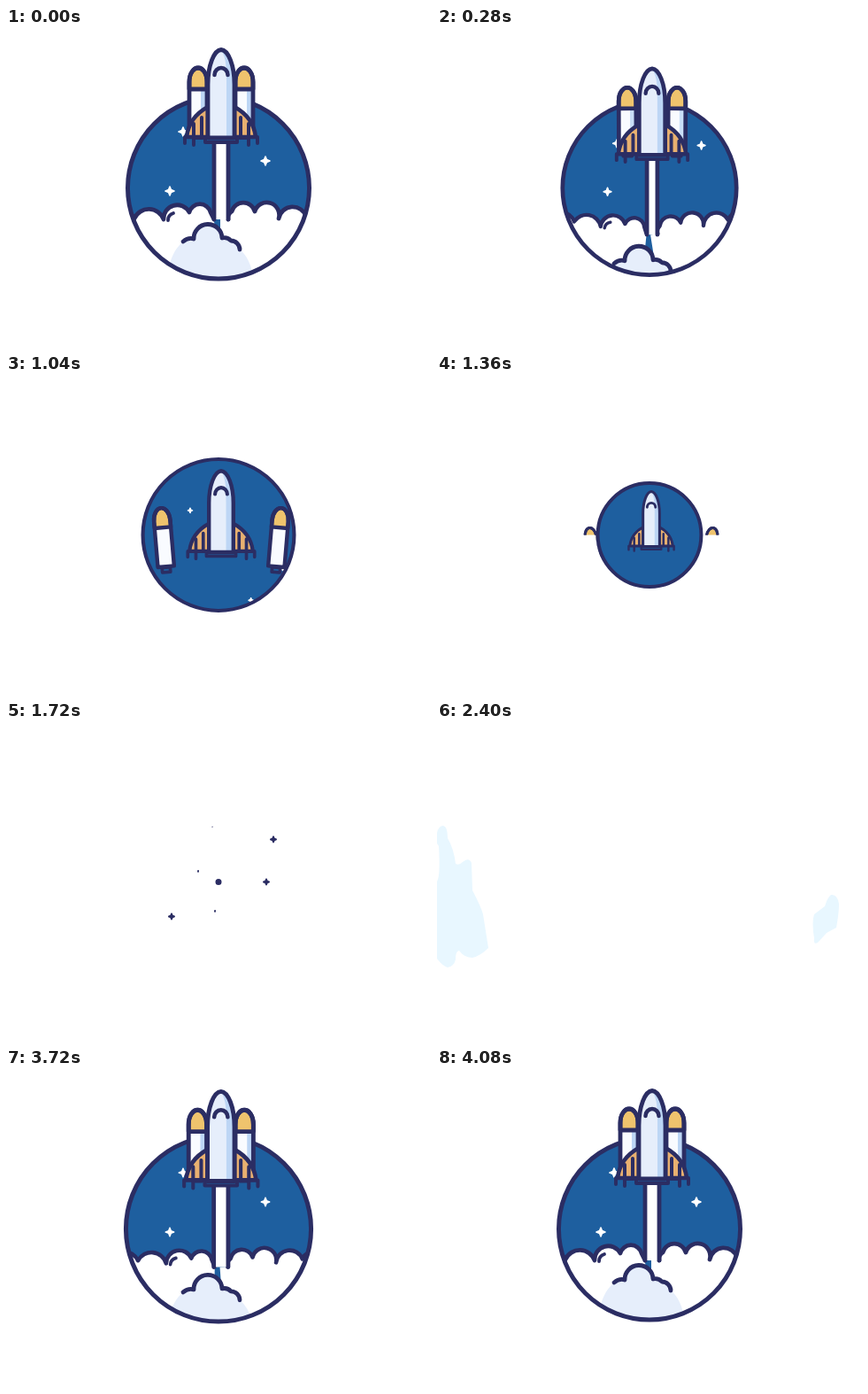
An HTML page with a canvas for the animation above (4120 ms loop, 480 px wide and 360 px high).

```html
<!DOCTYPE html>
<html lang="en">
<head>
<meta charset="utf-8">
<title>Rocket launch</title>
<style>
html, body { margin: 0; width: 100%; height: 100%; overflow: hidden; background: #fff; }
canvas { display: block; }
</style>
</head>
<body>
<canvas id="stage" width="480" height="360"></canvas>
<script>
const ctx = document.getElementById('stage').getContext('2d');
const LOOP = 4120, STEP = 40, CX = 240, CY = 180.5;
const COLLAPSE = 1140, BURST = 1720, BURST_END = 2240, MIST_IN = 2240, ENTER = 3080, SETTLED = 3960;
const INK = '#2b2d63', SKY = '#1e5f9f', PALE = '#e6eefb', ICE = '#bdd6f5';
const GOLD = '#efc36d', PEACH = '#e8b070', MIST = '#e8f7ff';

const span = (t, from, to) => Math.min(1, Math.max(0, (t - from) / (to - from)));
const mix = (a, b, u) => a + (b - a) * u;
const smooth = u => u * u * (3 - 2 * u);

// Ease-out with a slight overshoot; a higher delay holds the start back longer.
function spring(u, delay) {
  const left = 1 - u ** delay;
  return 1 - 1.8 * left ** 3 + 0.8 * left ** 2;
}

function shape(path, fill, stroke, width) {
  if (fill) { ctx.fillStyle = fill; ctx.fill(path); }
  if (stroke) { ctx.strokeStyle = stroke; ctx.lineWidth = width; ctx.stroke(path); }
}

function group(x, y, angle, sx, sy, draw) {
  ctx.save();
  ctx.translate(x, y);
  ctx.rotate(angle);
  ctx.scale(sx, sy);
  draw();
  ctx.restore();
}

// Cloud outlines are relative to the end that meets the trail.
const leftPuffs = 'M-121 4A18 18 0 0 1 -88 0A17.800 17.800 0 0 1 -55 1A15.400 15.400 0 0 1 -26 -7A12.400 12.400 0 0 1 -2 -7L2 1';
const rightPuffs = 'M-1 1Q-2 -5 3 -8A13.500 13.500 0 0 1 29 -8A14 14 0 0 1 56 0A16 16 0 0 1 87 -2A18 18 0 0 1 120 2';
const frontPuffs = 'M200 241Q206 236 212 238A16 16 0 0 1 244 237A10 10 0 0 1 254 240A10 10 0 0 1 264 250';
const boosterNose = 'M-10 26V18C-10 8 -5 2 0 2S10 8 10 18V';

const art = {
  body: new Path2D('M0 2.5C8 3 15 20 15 42V102H-15V42C-15 20 -8 3 0 2.5Z'),
  shade: new Path2D('M2 3C9 6 15 20 15 42V102H6V42C6 24 6 12 0 3Z'),
  window: new Path2D('M-7.5 31A7.5 8 0 0 1 7.5 31'),
  fin: new Path2D('M-15 67C-26 73 -37 84 -39 101H-15Z'),
  finLines: new Path2D('M-41 101V108M-31 86V110M-22 79V101'),
  nozzle: new Path2D('M-18 102H18V107H-18Z'),
  booster: new Path2D(boosterNose + '74H-10Z'),
  boosterShade: new Path2D('M3 27H9V73H3Z'),
  cap: new Path2D(boosterNose + '26Z'),
  boosterNozzle: new Path2D('M-5 75H5V81H-5Z'),
  left: { line: new Path2D(leftPuffs), fill: new Path2D(leftPuffs + 'L9 120H-121Z') },
  right: { line: new Path2D(rightPuffs), fill: new Path2D(rightPuffs + 'V120H-10V1Z') },
  glint: new Path2D('M-50 2Q-50 -4 -44 -6'),
  frontLine: new Path2D(frontPuffs),
  frontFill: new Path2D(frontPuffs + 'Q279 262 281 295H180C183 262 190 250 200 241Z'),
  mist: new Path2D('M0 125Q2 117 7 117Q12 118 12 131Q19 143 21 160Q25 162 29 158Q36 152 39 159L40 190Q50 209 52 217L58 255Q49 264 40 266Q31 266 25 258Q21 258 21 268Q19 276 12 277Q6 275 0 267V180Q4 174 2 140L0 137Z'
    + 'M445 195Q452 194 454 205Q454 216 451 232L440 238L430 249Q425 252 426 244Q423 226 426 217L438 208Q441 198 445 195Z')
};

function star(x, y, size, color, outline) {
  if (size <= 0) return;
  const p = new Path2D();
  for (let i = 0; i <= 8; i++) {
    const reach = i % 2 ? size * 0.4 : size, a = i * Math.PI / 4;
    p.lineTo(x + reach * Math.sin(a), y - reach * Math.cos(a));
  }
  shape(p, color, color, outline);
}

// Start position and drift; all stars share one downward acceleration.
const stars = [
  { x: 293, y: 150, vx: 0.02, vy: -0.11 },
  { x: 185, y: 184, vx: 0.027, vy: -0.045 },
  { x: 200, y: 117, vx: 0.011, vy: 0 },
  { x: 260, y: 33, vx: 0.016, vy: 0.036 },
  { x: 208, y: -31, vx: 0, vy: 0 }
];

function drawStars(t, size) {
  for (const s of stars) star(s.x + s.vx * t, s.y + s.vy * t + 1.7e-4 * t * t, size, '#fff', 1.6);
}

function drawClouds(drop) {
  const turn = Math.min(1, Math.max(0, drop)), size = 1 - 0.24 * turn;
  const both = draw => {
    for (const [cloud, x, dir] of [[art.left, 233, 1], [art.right, 252, -1]])
      group(x + 6 * dir * turn, 215 + 49 * drop, 0.48 * dir * turn, size, size, () => draw(cloud));
  };
  both(cloud => shape(cloud.fill, '#fff'));
  both(cloud => {
    shape(cloud.line, null, INK, 4.8);
    if (cloud === art.left) shape(art.glint, null, INK, 3.8);
  });
}

function drawTrail(x, top, bottom, half) {
  if (half < 0.5) return;
  const column = new Path2D();
  column.moveTo(x - half, bottom);
  column.lineTo(x - half, top);
  column.lineTo(x + half, top);
  column.lineTo(x + half, bottom);
  shape(column, '#fff', INK, Math.min(4.8, half * 0.8));
}

function drawBooster(shadeAlpha) {
  shape(art.boosterNozzle, SKY, INK, 4);
  shape(art.booster, '#f9fbff');
  ctx.globalAlpha = shadeAlpha;
  shape(art.boosterShade, ICE);
  ctx.globalAlpha = 1;
  shape(art.cap, GOLD, INK, 4.8);
  shape(art.booster, null, INK, 4.8);
}

function drawRocket(split) {
  for (const side of [-1, 1])
    group(side * (26 + 48 * split), 21 + 25 * split, side * 0.085 * split, 1, 1,
      () => drawBooster(Math.max(0, 1 - 4 * split)));
  for (const side of [1, -1]) group(0, 0, 0, side, 1, () => {
    shape(art.fin, PEACH, INK, 4.6);
    shape(art.finLines, null, INK, 4);
  });
  shape(art.nozzle, SKY, INK, 4);
  shape(art.body, PALE);
  shape(art.shade, ICE);
  shape(art.body, null, INK, 4.8);
  shape(art.window, null, INK, 4.5);
}

// Launch, booster separation, then everything shrinks to a dot.
function leaving(t) {
  const launch = smooth(span(t, 0, 850)), keep = 1 - smooth(span(t, COLLAPSE, BURST));
  return {
    outer: mix(3.5, mix(105, 87.5, launch), keep),
    x: CX + 3 * keep,
    tip: mix(CY, mix(22, 106, launch), keep),
    scale: mix(1, 0.92, launch) * keep,
    drop: Math.min(2.2, (t / 560) ** 1.6),
    half: Math.max(0, 8 - 0.0075 * t),
    split: (t / 1040) ** 2.2,
    starTime: t,
    starSize: mix(5, 2.5, launch)
  };
}

// The disc springs open, the rocket rises, clouds and stars follow.
function entering(t) {
  const u = span(t, ENTER, SETTLED), open = spring(u, 1.4);
  const settle = spring(span(t, 3420, SETTLED), 1.4), scale = mix(0.2, 1, open);
  return {
    outer: 105 * open,
    x: CX + 3 * settle,
    tip: mix(260, 22, spring(u, 1.9)),
    scale,
    drop: 2.2 * (1 - settle),
    half: 8 * scale,
    split: 0,
    starTime: 0,
    starSize: 5 * settle
  };
}

function drawScene({ outer, x, tip, scale, drop, half, split, starTime, starSize }) {
  if (outer < 0.3) return;
  const line = Math.min(outer, Math.max(4, outer * 0.047));
  const disc = new Path2D();
  disc.arc(CX, CY, outer - line / 2, 0, Math.PI * 2);
  shape(disc, SKY);
  ctx.save();
  ctx.clip(disc);
  drawStars(starTime, starSize);
  drawClouds(drop);
  drawTrail(x, tip + 104 * scale, 216 + 52 * drop, half);
  ctx.translate(0, 75 * drop);
  shape(art.frontFill, PALE);
  shape(art.frontLine, null, INK, 4.8);
  ctx.restore();
  shape(disc, null, INK, line);

  // The rocket may rise above the disc but never hang below it.
  const gate = new Path2D();
  gate.rect(0, 0, 480, CY);
  gate.arc(CX, CY, outer, 0, Math.PI);
  ctx.save();
  ctx.clip(gate);
  group(x, tip, 0, scale, scale, () => drawRocket(split));
  ctx.restore();
}

const sparks = [[62, -48, 3], [54, 0, 3], [-53, 39, 3], [-4, 33, 1], [-23, -12, 1], [-7, -62, 0.4]];

function drawSparks(u) {
  const spread = 1 + 0.85 * smooth(u), grow = (1 - u) * (1 + 3 * u);
  for (const [x, y, s] of sparks)
    star(CX + x * spread, CY + y * spread, s * grow, INK, Math.min(2, s * grow));
}

function render(t) {
  ctx.fillStyle = '#fff';
  ctx.fillRect(0, 0, 480, 360);
  ctx.lineCap = ctx.lineJoin = 'round';
  if (t <= BURST) drawScene(leaving(t));
  if (t >= ENTER) drawScene(entering(t));
  if (t >= BURST && t < BURST_END) drawSparks(span(t, BURST, BURST_END));
  if (t > MIST_IN && t < ENTER) {
    ctx.globalAlpha = span(t, MIST_IN, MIST_IN + 160);
    shape(art.mist, MIST);
    ctx.globalAlpha = 1;
  }
}

const start = performance.now();
function tick() {
  const t = (performance.now() - start) % LOOP;
  render(Math.floor(t / STEP) * STEP);
  requestAnimationFrame(tick);
}
tick();
</script>
</body>
</html>
```
